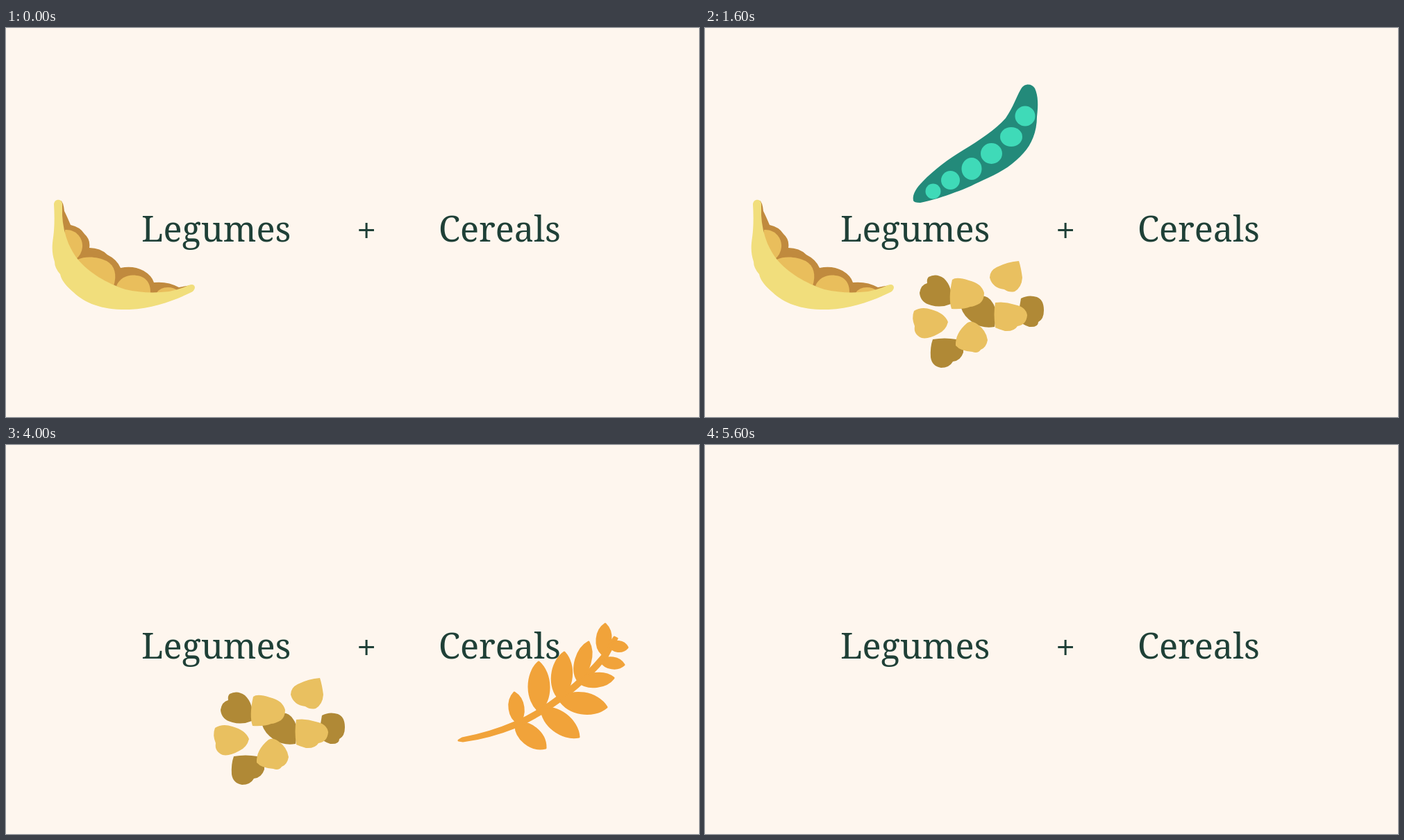
Recreate the animation shown at these times as an HTML page. Size 998x561 px, loop 6400 ms.

```html
<!DOCTYPE html>
<html lang="en">
<head>
<meta charset="utf-8">
<title>Legumes + Cereals</title>
<style>
  html, body { margin: 0; height: 100%; overflow: hidden; background: #fef6ee; }
  svg { display: block; width: 100vw; height: 100vh; }
  text { font: 300 50.5px "Noto Serif", serif; fill: #1f4037; }
  .light { fill: #e9c060; }
  .dark { fill: #b08936; }
</style>
</head>
<body>
<svg viewBox="0 0 998 561">
  <text x="195" y="308">Legumes</text>
  <text x="519" y="310" text-anchor="middle">+</text>
  <text x="623" y="308">Cereals</text>

  <g id="soy">
    <path fill="#c08a3e" d="M79 249Q83 252 84 264Q88 272 93 284Q107 287 113 297Q122 305 120 317Q136 317 146 327Q160 334 165 346Q183 342 198 350Q210 357 213 367Q233 365 249 374L266 371L250 380L190 386L130 365L95 335L78 290Z"/>
    <g fill="#e9be5c">
      <path d="M85 291C101 290 111 303 110 316Q109 327 100 334L84 308Z"/>
      <path d="M103 334C115 328 133 330 145 336C157 343 160 356 155 372L125 362Z"/>
      <path d="M159 372C164 360 176 355 188 357C201 358 209 368 208 383L180 382Z"/>
      <path d="M217 382Q222 374 233 374Q242 374 247 379L232 384Z"/>
    </g>
    <path fill="#f1de7c" d="M69 254C70 246 80 246 81 253L81 270Q82 291 90 311Q97 326 103 333C119 353 145 368 172 377Q202 384 235 380Q250 377 263 371Q271 368 272 374Q272 379 265 382C240 394 212 404 178 406C140 407 115 398 97 381C88 373 80 365 78 355Q70 346 70 337C66 325 66 315 68 302C70 288 70 270 69 254Z"/>
  </g>

  <g id="pea">
    <path fill="#238a7a" d="M300 249C298 239 306 229 313 222C330 204 352 188 372 176C395 162 419 146 433 130C445 112 447 102 455 88C460 79 471 80 475 87C480 98 480 112 478 128C478 150 470 168 459 180C445 196 428 207 408 216C390 224 376 232 360 237C345 243 325 249 310 252Q301 252 300 249Z"/>
    <g fill="#3fdab8">
      <circle cx="461" cy="127" r="14.5"/>
      <ellipse cx="441" cy="157" rx="16" ry="14"/>
      <ellipse cx="412.500" cy="181" rx="15.500" ry="15"/>
      <ellipse cx="384" cy="203" rx="14.500" ry="16"/>
      <circle cx="353.500" cy="219.500" r="13.500"/>
      <circle cx="328.500" cy="235.500" r="11"/>
    </g>
  </g>

  <g id="chickpea">
    <path class="dark" d="M322 359Q333 353 344 361Q358 374 354 398Q340 404 326 400Q310 396 309 382Q311 370 320 368Q319 362 322 359Z"/>
    <path class="dark" d="M391 388Q406 383 414 396Q421 405 417 431Q400 434 386 425Q372 415 369 404Z"/>
    <path class="light" d="M356 363Q362 358 380 364Q398 368 402 382Q402 392 396 397Q387 402 382 402Q372 406 355 405Q350 390 356 363Z"/>
    <path class="light" d="M410 360Q410 350 420 345Q436 337 452 336Q455 345 457 360Q456 374 446 380Q438 382 431 377Q414 375 410 360Z"/>
    <path class="dark" d="M455 390Q466 384 478 388Q488 392 488 407Q488 420 480 424Q480 432 467 431Q457 428 450 420Z"/>
    <path class="light" d="M418 396Q432 394 446 399Q462 402 464 414Q463 428 450 430Q445 438 432 437Q422 434 418 432Q415 412 418 396Z"/>
    <path class="light" d="M301 408Q312 401 326 406Q345 411 350 424Q347 436 336 441Q322 449 312 447Q300 442 302 430Q297 418 301 408Z"/>
    <path class="dark" d="M328 449Q345 446 362 449Q374 458 372 468Q368 480 357 481Q352 490 340 490Q327 488 325 475Q324 460 328 449Z"/>
    <path class="light" d="M378 425Q384 421 392 427Q405 436 407 450Q405 461 397 464Q393 470 385 467Q368 466 361 458Q360 440 378 425Z"/>
  </g>

  <g id="wheat" fill="#f1a33a" stroke="#f1a33a" stroke-width="3" stroke-linejoin="round" stroke-linecap="round">
    <path d="M652 426L657 423Q696 416 733 400C780 379 828 341 860 302L876 277L880 279L866 305C834 345 785 384 736 406Q696 422 658 427Z"/>
  </g>
</svg>
<script>
  const LOOP = 6400, STEP = 800, STAY = 3200;
  const plants = ["soy", "pea", "chickpea", "wheat"].map(id => document.getElementById(id));

  // Each leaf: base x, y, tip x, y, full width
  const leaves = [
    [738, 401, 732, 357, 20], [768, 384, 767, 313, 29], [797, 366, 804, 299, 28],
    [823, 339, 839, 284, 21], [859, 302, 863, 258, 20], [734, 402, 777, 437, 26],
    [771, 380, 825, 421, 28], [797, 367, 865, 378, 29], [825, 342, 875, 336, 19],
    [857, 312, 890, 317, 15], [869, 289, 895, 292, 14]
  ];

  function leafPath([x, y, tipX, tipY, width]) {
    const dx = tipX - x, dy = tipY - y, k = width / 1.5 / Math.hypot(dx, dy);
    const at = (along, side) => `${x + dx * along - dy * k * side} ${y + dy * along + dx * k * side}`;
    return `M${x} ${y}C${at(.22, 1)} ${at(.76, 1)} ${tipX} ${tipY}C${at(.76, -1)} ${at(.22, -1)} ${x} ${y}Z`;
  }

  for (const leaf of leaves) {
    const path = document.createElementNS(plants[3].namespaceURI, "path");
    path.setAttribute("d", leafPath(leaf));
    plants[3].append(path);
  }

  function draw(now) {
    const t = now % LOOP;
    plants.forEach((plant, i) => {
      const age = t - i * STEP;
      plant.style.display = age >= 0 && age < STAY ? "" : "none";
    });
    requestAnimationFrame(draw);
  }
  draw(performance.now());
</script>
</body>
</html>
```
